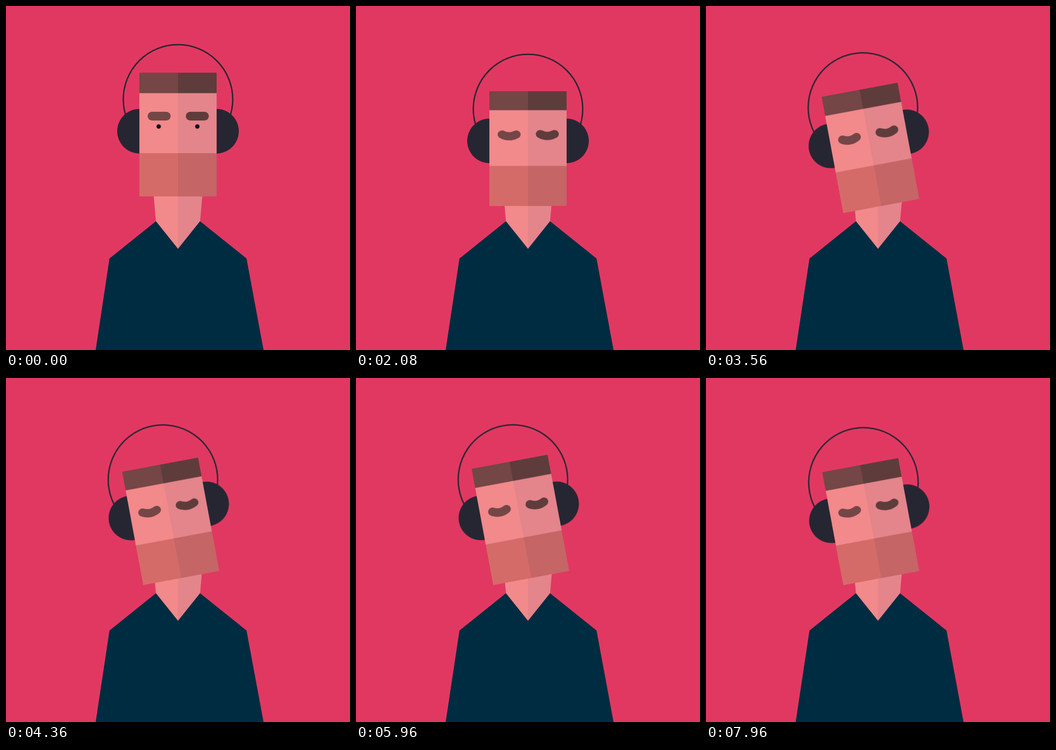
An HTML page that plays this animation: 748 px wide and 748 px high, repeating every 8 s.

```html
<!DOCTYPE html>
<html lang="en">
<head>
<meta charset="utf-8">
<title>Head bob</title>
<style>
  html, body { margin: 0; height: 100%; overflow: hidden; background: #e13861; }
  svg { display: block; width: 100vw; height: 100vh; }

  .tilt, .phones, .head, .brow, .brow path, .eye {
    animation: 8s infinite cubic-bezier(.364, 0, .636, 1);
  }
  .tilt { transform-origin: 374px 397px; animation-name: tilt; }
  .phones { fill: #262633; animation-name: phones; }
  .head { transform-origin: 374px 414px; animation-name: head; }
  .brow { fill: none; stroke-width: 19; stroke-linecap: round; animation-name: brow; }
  .brow .left { stroke: #744646; animation-name: bend-left; }
  .brow .right { stroke: #5f3c3c; animation-name: bend-right; }
  .eye { fill: #0c0a20; transform-origin: 374px 262px; animation-name: shut; }

  @keyframes tilt {
    0%, 30% { transform: rotate(0deg); }
    31.5%, 100% { transform: rotate(-10.55deg); }
  }
  /* The headphones lag behind the head; each bob lasts 2.4 s and the last one is cut short. */
  @keyframes phones {
    0%, 12% { transform: translateY(0); }
    28%, 37.5%, 60%, 67.5%, 90% { transform: translateY(21.8px); }
    50%, 80% { transform: translateY(10.1px); }
    97.5% { transform: translateY(21.8px); animation-timing-function: cubic-bezier(.333, 0, .667, .333); }
    100% { transform: translateY(20.7px); }
  }
  @keyframes head {
    0%, 12% { transform: translateY(0) scaleY(1); }
    28%, 37.5%, 57.5%, 67.5%, 87.5% { transform: translateY(21.8px) scaleY(.9253); }
    47.5%, 77.5% { transform: translateY(21.8px) scaleY(.9654); }
    97.5% { transform: translateY(21.8px) scaleY(.9253); animation-timing-function: cubic-bezier(.333, 0, .667, .333); }
    100% { transform: translateY(21.8px) scaleY(.9312); }
  }
  @keyframes brow {
    0%, 12% { transform: translateY(0); }
    28%, 37.5%, 57.5%, 67.5%, 87.5% { transform: translateY(7.1px); }
    47.5%, 77.5% { transform: translateY(10.8px); }
    97.5% { transform: translateY(7.1px); animation-timing-function: cubic-bezier(.333, 0, .667, .333); }
    100% { transform: translateY(7.6px); }
  }
  @keyframes bend-left {
    0%, 12% { d: path("M317.5 239.5Q333 239.5 348.5 239.5"); }
    28%, 100% { d: path("M317.5 239.5Q333 248.5 348.5 239.5"); }
  }
  @keyframes bend-right {
    0%, 12% { d: path("M400.5 239.5Q416 239.5 431.5 239.5"); }
    28%, 100% { d: path("M400.5 238.5Q416 247.5 431.5 238.5"); }
  }
  @keyframes shut {
    0%, 12% { transform: scaleY(1); }
    24%, 100% { transform: scaleY(0); }
  }
</style>
</head>
<body>
<svg viewBox="0 0 748 748">
  <path fill="#f2898b" d="M320 400H375V529L374 528L326 468Z"/>
  <path fill="#e4848b" d="M374 400H428L422 468L374 528Z"/>
  <path fill="#002c41" d="M326 468L374 528L422 468L523 549L560 748H195L225 549Z"/>

  <g class="tilt">
    <g class="phones">
      <circle cx="374" cy="203" r="119" fill="none" stroke="#262633" stroke-width="3"/>
      <circle cx="290.3" cy="272.3" r="48.5"/>
      <circle cx="457.7" cy="272.3" r="48.5"/>
    </g>
    <g class="head">
      <path fill="#f2898b" d="M290 189H375V321H290Z"/>
      <path fill="#e4848b" d="M374 189H458V321H374Z"/>
      <path fill="#744646" d="M290 145H375V189.5H290Z"/>
      <path fill="#5f3c3c" d="M374 145H458V189.5H374Z"/>
      <path fill="#d56b69" d="M290 320H375V414H290Z"/>
      <path fill="#c56566" d="M374 320H458V414H374Z"/>
      <g class="eye">
        <circle cx="332" cy="262" r="4.8"/>
        <circle cx="416" cy="262" r="4.8"/>
      </g>
      <g class="brow">
        <path class="left" d="M317.5 239.5Q333 239.5 348.5 239.5"/>
        <path class="right" d="M400.5 239.5Q416 239.5 431.5 239.5"/>
      </g>
    </g>
  </g>
</svg>
</body>
</html>
```
